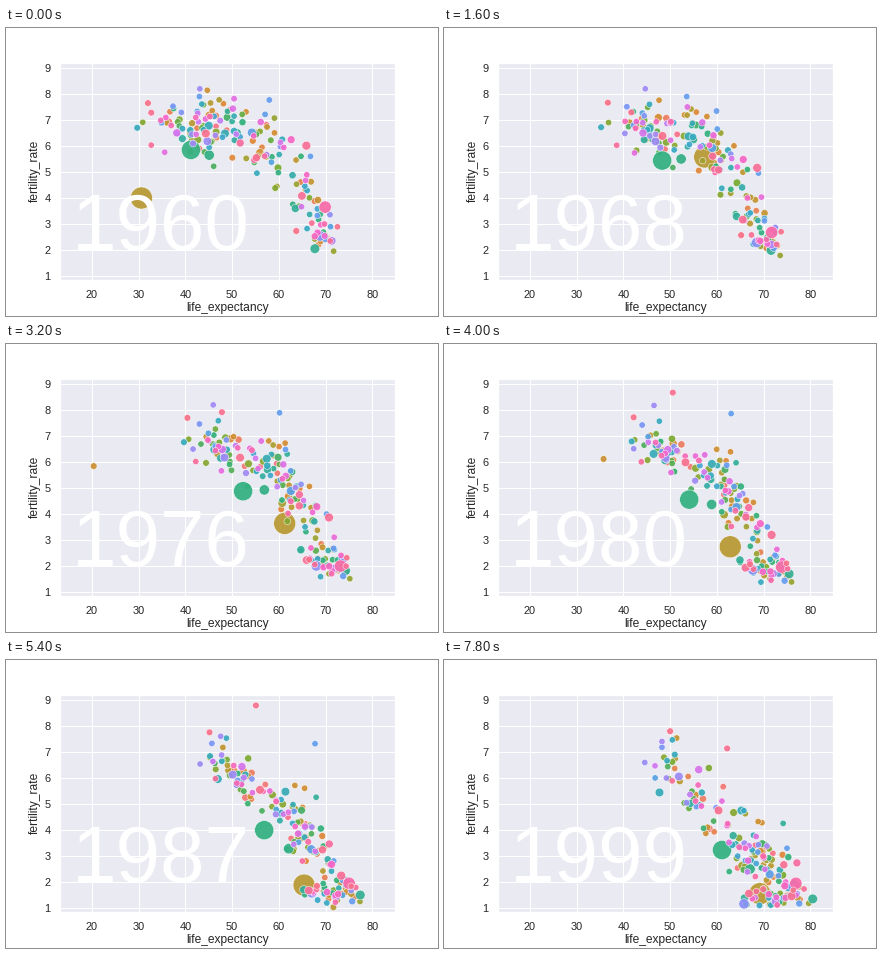
Animation of 432x288 px, one loop 8 s. Source, as a matplotlib script:

```python
import numpy as np
import matplotlib.pyplot as plt
from matplotlib.animation import FuncAnimation
from matplotlib.colors import LinearSegmentedColormap

START, COUNT = 1960, 40
YEARS = np.arange(START, START + COUNT)
T = np.linspace(0, 1, COUNT)
INK, PANEL = "#262626", "#eaeaf2"
WHEEL = ["#f77189", "#dc8932", "#ae9d31", "#77ab31", "#33b07a", "#36ada4",
         "#38a9c5", "#6e9bf4", "#cc7af4", "#f565cc", "#f77189"]
hues = LinearSegmentedColormap.from_list("wheel", WHEEL)
rng = np.random.default_rng(11)
dots = []


def ease(mid, width):
    """Logistic step around the year mid, scaled to run from 0 to 1."""
    s = 1 / (1 + np.exp((mid - YEARS) / width))
    return (s - s[0]) / (s[-1] - s[0])


def add(hue, share, life, fert, mid=1982, width=8, bend=0.85,
        shock=(1960, 1), depth=(0, 0)):
    """Move a dot between two (start, end) pairs.

    bend shapes the gain in life expectancy, mid and width the fertility
    change; shock (year, spread) lowers both values for a while by depth.
    """
    dip = np.exp(-((YEARS - shock[0]) / shock[1]) ** 2)
    x = life[0] + (life[1] - life[0]) * T ** bend - depth[0] * dip
    y = fert[0] + (fert[1] - fert[0]) * ease(mid, width) - depth[1] * dip
    dots.append((hue, np.full(COUNT, share), x, y))


def add_random(life, fert, mid, width=8):
    add(rng.random(), 0.1 * rng.random() ** 6, life, fert, mid, width,
        rng.uniform(0.65, 0.95))


def late():
    p = rng.random()
    add_random((rng.normal(41.5, 3.8), rng.normal(47 + 12 * p, 2)),
               (rng.normal(6.6, 0.55), rng.normal(6.8 - 2.2 * p, 0.5)),
               rng.uniform(1985, 1999))


def middle():
    p = rng.random()
    add_random((rng.normal(43 + 20 * p, 3.2), rng.normal(64 + 9 * p, 3)),
               (rng.normal(6.8 - 2 * p ** 4, 0.6),
                rng.normal(4.3 - 2.3 * p, 0.55)),
               1990 - 16 * p)


def early():
    p = rng.random()
    life = rng.normal(71 - 5 * p, 1.7)
    add_random((life, life + rng.uniform(1, 9)),
               (rng.normal(2.3 + 2.2 * p ** 2, 0.25), rng.uniform(1.1, 2.1)),
               rng.uniform(1968, 1978), 6)


# the largest populations
add(0.18, 1, (50, 69.2), (6.5, 1.55), 1974, 5, 0.6, (1960, 3), (19.4, 2.5))
add(0.415, 0.74, (41.2, 61.1), (5.85, 3.23), 1981, 12, 0.65)
add(0.95, 0.25, (69.9, 76.9), (3.65, 1.95), 1967, 2.5)
add(0.425, 0.15, (45.1, 67.1), (5.65, 2.5), 1982, 5, 0.7)
add(0.73, 0.15, (68.8, 65.8), (2.54, 1.16), 1982, 20, 1.5)
add(0.46, 0.12, (67.7, 80.5), (2.05, 1.35), 1980, 6, 0.75)

# dots far from the crowd
add(0.985, 0.01, (32.7, 62.2), (7.28, 7.08), bend=0.75,
    shock=(1984, 8), depth=(0, -1.9))
add(0, 0.01, (32, 50), (7.65, 7.8))
add(0.57, 0.01, (29.7, 51), (6.7, 6.9))
add(0.75, 0, (43.1, 49.2), (8.2, 6), 1989, 2, shock=(1994, 1), depth=(31, 0))
add(0.14, 0.01, (41, 58), (6.5, 4.1), 1992, 3, shock=(1977, 3.5), depth=(31, 0.7))
add(0.68, 0, (43, 75), (7.9, 3.3), 1992, 2.5, 0.7)

for maker, amount in ((late, 44), (middle, 84), (early, 46)):
    for _ in range(amount):
        maker()
dots.sort(key=lambda d: d[0])
hue, share, life, fert = (np.array(part) for part in zip(*dots))
sizes = 40 + 444 * share

plt.rcParams.update({
    "font.family": "Liberation Sans", "text.color": INK,
    "axes.labelcolor": INK, "xtick.color": INK, "ytick.color": INK,
})
fig = plt.figure(figsize=(6, 4), dpi=72, facecolor="white")
ax = fig.add_axes((0.125, 0.125, 0.775, 0.755), facecolor=PANEL)
ax.set(xlim=(13.187, 84.80), ylim=(0.846, 9.209),
       xticks=range(20, 81, 10), yticks=range(1, 10))
ax.set_xlabel("life_expectancy", fontsize=12, labelpad=3)
ax.set_ylabel("fertility_rate", fontsize=12, labelpad=3)
ax.tick_params(length=0, pad=9.5, labelsize=11)
ax.grid(color="white", linewidth=1)
ax.set_axisbelow(True)
for spine in ax.spines.values():
    spine.set(color="white", linewidth=1.25)

cloud = ax.scatter(life[:, 0], fert[:, 0], s=sizes[:, 0], c=hues(hue),
                   edgecolors="white", linewidths=0.5, alpha=0.93)
label = ax.text(15.8, 2, "", fontsize=80, color="white", zorder=3)


def draw(i):
    cloud.set_offsets(np.column_stack((life[:, i], fert[:, i])))
    cloud.set_sizes(sizes[:, i])
    label.set_text(str(YEARS[i]))
    return cloud, label


anim = FuncAnimation(fig, draw, frames=COUNT, interval=200, repeat=True,
                     repeat_delay=0, blit=False)
plt.show()
```
